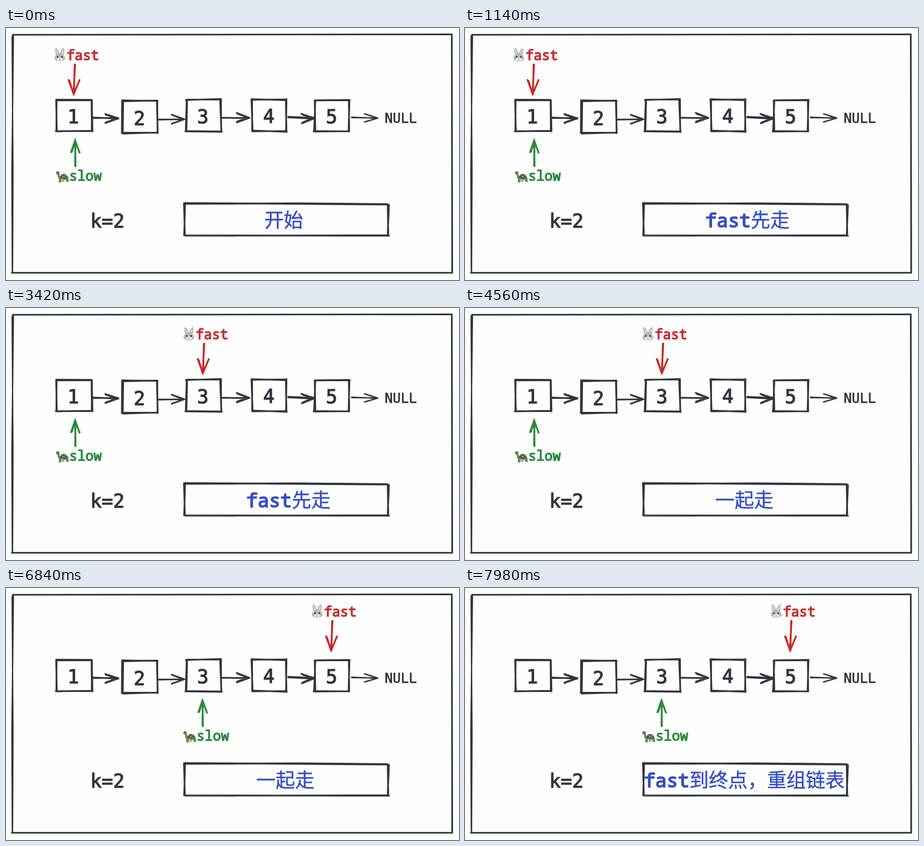
These frames come from a looping animation (1003x558 px, 8000 ms). An HTML page:

```html
<!DOCTYPE html>
<html lang="zh-CN">
<head>
<meta charset="utf-8">
<style>
html, body { margin: 0; width: 100%; height: 100%; overflow: hidden; background: #fefefe; }
svg { display: block; width: 1003px; height: 558px; }
.ink { fill: none; stroke: #30363f; stroke-width: 3.7; stroke-linecap: round; stroke-linejoin: round; }
.digits { font: 42px "DejaVu Sans Mono", monospace; fill: #30363f; stroke: #30363f; stroke-width: 1.5; text-anchor: middle; }
.null { font-size: 29.5px; stroke-width: .9; text-anchor: start; }
.word { font: 30px "Noto Sans Mono", "DejaVu Sans Mono", monospace; stroke-width: 1.6; }
.arrow { fill: none; stroke-linecap: round; stroke-width: 4; }
#fast .word { fill: #c92a2a; stroke: #c92a2a; }
#fast .arrow { stroke: #c92a2a; }
#slow .word { fill: #2b8a3e; stroke: #2b8a3e; }
#slow .arrow { stroke: #2b8a3e; }
#note { fill: #364fc7; stroke: #364fc7; }
#latin { font: 42px "Noto Sans Mono", "DejaVu Sans Mono", monospace; stroke-width: 2.2; }
#hanzi { font: 43px "Noto Sans CJK SC", "Noto Sans CJK", sans-serif; stroke-width: .6; }
</style>
</head>
<body>
<svg viewBox="0 0 1003 558">
  <g class="ink">
    <!-- outer border -->
    <path d="M15 15 987 14M987 14 988 542M13 542 988 542"/>
    <path stroke-width="2.8" d="M16.5 15 13 320 14 542M13.5 18 15.5 320 14.5 541"/>
    <!-- list nodes -->
    <path d="M111 160.5 190 160M111 158.5 190 159M190 159 191.5 229M189.5 161 190 228M110 228 191 228.5M112 229 190 227.5M111 160 112.5 228M112 160 111.5 229"/>
    <path d="M257 160 336 161.5M258 162.5 335 160.5M335 161 335.5 233M334 162 336 232M256 231.5 336 232M258 234 334 231.5M257 161 256.5 232M259.5 163 258.5 231"/>
    <path d="M398 159.5 476 157M400 158.5 475 158.5M474 158 477 230M476 158 476.5 228M397 229 478 230M398 228 476 229M400 159 398 228M401 160 399.5 228"/>
    <path d="M543 157.5 621 160M545 159 621 158M621 157 620 230M619.5 160 621 229M546 227 622 230M545 229 621 228M543.5 159 546 228M545 159 545 228"/>
    <path d="M683 160.5 760 160M685 160 761 159M759 160 760 229M760.5 160 758.5 228M681 228 760 229M682 229.5 759 228.5M685 160 682 229M683.5 162 685 228"/>
    <!-- links -->
    <path d="M192 198 249 201M193 199.5 248 199M220 190.5 249 200 220 210.5M221 192 247 200 221 209"/>
    <path d="M337 203 395 202M338 202.5 394 202.5M367 192 395 202 367 212M369 193 393 202"/>
    <path d="M479 199 539 199M480 198.5 537 200M511 188 539 199 511 209M513 190 537 198.5 512 207"/>
    <path d="M625 196.5 683 199M625 198 682 201M654 190 683 200 655 211M656 192 682 199 657 209"/>
    <path stroke-width="3" d="M765 197.5 823 200M766 198.5 821 199M794 190 823 199.5 794 208"/>
    <!-- message box -->
    <path d="M394 387.5 846 391M396 389.5 640 388 845 390M394 459 848 460M397 460 846 459M394 388 396 458M396.5 389 394.5 459M848 392 845 460M845 390 846.5 459"/>
  </g>

  <g class="digits">
    <text x="149" y="211">1</text>
    <text x="295.5" y="214.5">2</text>
    <text x="436" y="211">3</text>
    <text x="582" y="210">4</text>
    <text x="721" y="211">5</text>
    <text x="224.5" y="442">k=2</text>
    <text class="null" x="838.5" y="209.5">NULL</text>
  </g>

  <g id="fast">
    <g fill="#b9b8b9" stroke="#98979a" stroke-width=".6">
      <path d="M110.5 44.5Q107.5 51 112 60L118 59Q118 49 110.5 44.5ZM127.5 44.5Q130.5 51 126 60L120 59Q120 49 127.5 44.5Z"/>
      <path d="M119 56.5C125 56.5 129 61 130.5 67C130 71 125 73.5 119 73.5C113 73.5 108 71 107.5 67C109 61 113 56.5 119 56.5Z"/>
    </g>
    <path fill="#e2d3d4" d="M111.2 47.5Q110 52 113.5 58L116 57Q116 51 111.2 47.5ZM126.8 47.5Q128 52 124.5 58L122 57Q122 51 126.8 47.5Z"/>
    <ellipse cx="119" cy="69.3" rx="6.5" ry="4" fill="#eeecec"/>
    <path fill="#222" d="M112.7 64a1.6 2 0 1 0 3.2 0a1.6 2 0 1 0-3.2 0M122.1 64a1.6 2 0 1 0 3.2 0a1.6 2 0 1 0-3.2 0"/>
    <path fill="#bc8f91" d="M117.2 67h3.6l-1.8 2.2z"/>
    <path fill="none" stroke="#888" stroke-width=".8" d="M119 69v2m-2 1q2-.2 2-1q0 .8 2 1"/>
    <text class="word" x="134" y="71">fast</text>
    <path class="arrow" d="M152 81 150.5 146M153 81 149.5 145M138.5 115 150 146 163 115M140.5 117 149 145"/>
  </g>

  <g id="slow">
    <path fill="#668b50" d="M110.5 321Q110.5 317 115 317Q119 317.5 118.5 323L119.5 329 123 333 119 336Q114 332 114.5 325Q110.5 324 110.5 321ZM117 333 124 336 122 342H117ZM132 335 138 333 139 341H134ZM125 337H130L128.5 340H125ZM136 333 140 338 135 337Z"/>
    <path fill="#3f6342" d="M119 331Q121 323 128 323Q136 324 138.5 334Q130 338 119 333Z"/>
    <path fill="none" stroke="#9bad72" stroke-width="1.1" d="M123 326 127 329 125 334M127 329 132 326M127 329 133 332 136 331M118.5 333Q129 338 138 334"/>
    <circle cx="114" cy="320" r=".9" fill="#222"/>
    <text class="word" x="140" y="338">slow</text>
    <path class="arrow" d="M154 306 153 249M153 305 154 250M144 275 153 249 163 276M146 274 152.5 251"/>
  </g>

  <text id="note" y="441"><tspan id="latin"></tspan><tspan id="hanzi"></tspan></text>
</svg>
<script>
const STEP = 1140, LOOP = 8000;
const fastAt = [[0, 0], [144, -2], [286, -2], [432, -5], [570, -8]];
const slowAt = [[0, 0], [139, 1], [282, 0]];
const notes = [
  [572, "", "开始"],
  [532, "fast", "先走"],
  [554, "", "一起走"],
  [396, "fast", "到终点，重组链表"]
];
// each step: fast position, slow position, message
const steps = [
  [0, 0, 0], [0, 0, 1], [1, 0, 1], [2, 0, 1],
  [2, 0, 2], [3, 1, 2], [4, 2, 2], [4, 2, 3]
];
const el = id => document.getElementById(id);
let shown = -1;

function show(index) {
  const [f, s, n] = steps[index];
  const [x, latin, hanzi] = notes[n];
  el("fast").setAttribute("transform", `translate(${fastAt[f]})`);
  el("slow").setAttribute("transform", `translate(${slowAt[s]})`);
  el("note").setAttribute("x", x);
  el("latin").textContent = latin;
  el("hanzi").textContent = hanzi;
}

function tick() {
  const index = Math.floor(performance.now() % LOOP / STEP);
  if (index !== shown) show(shown = index);
  requestAnimationFrame(tick);
}
tick();
</script>
</body>
</html>
```
